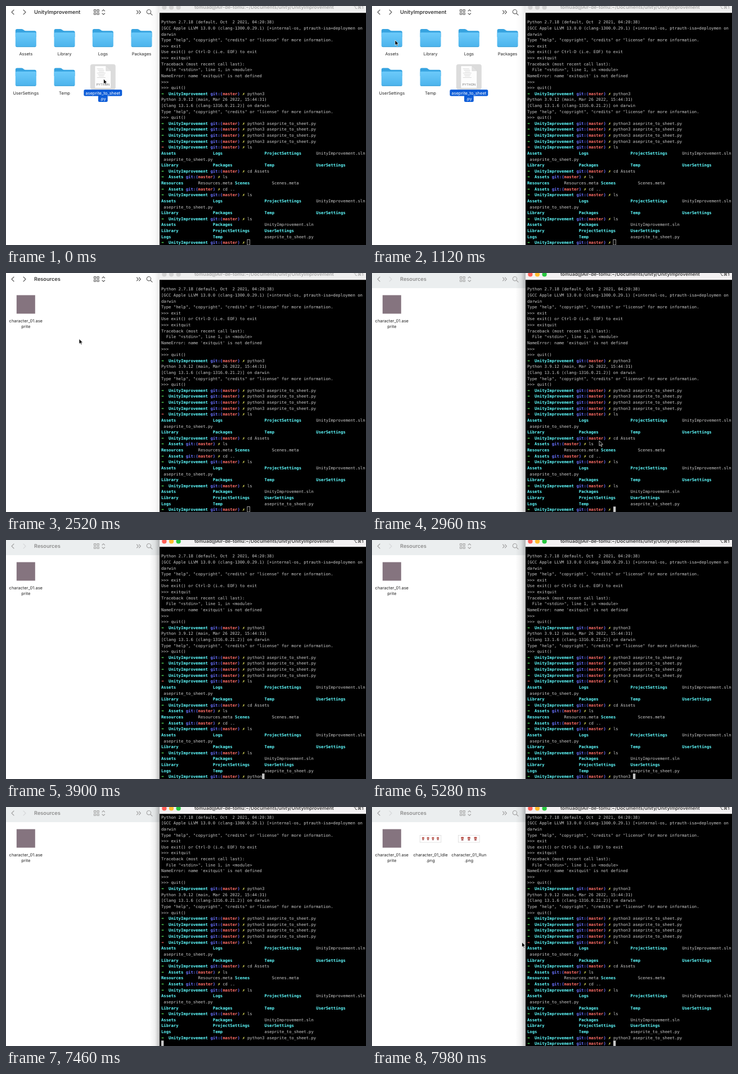
Animation of 640x426 px, one loop 8000 ms. Source, as an HTML page:

```html
<!DOCTYPE html>
<html lang="en">
<head>
<meta charset="utf-8">
<title>Sprite export from the terminal</title>
<style>
  html, body { margin: 0; width: 100%; height: 100%; overflow: hidden; background: #fff; }
  svg { display: block; width: 640px; height: 426px; }
  text { white-space: pre; text-rendering: geometricPrecision; }
  .ui { font-family: Inter, "Open Sans", sans-serif; }
  .label { font-size: 7.5px; text-anchor: middle; fill: #262626; }
  .head { font-size: 9.2px; font-weight: 600; }
  .mono { font: 7.26px "DejaVu Sans Mono", "Noto Sans Mono", monospace; fill: #cbcbcb; }
  .g, .c, .b, .r, .y { font-weight: 700; }
  .g { fill: #5ff967; }
  .c { fill: #5ffdff; }
  .b { fill: #6871ff; }
  .r { fill: #ff6d67; }
  .y { fill: #fefb67; }
</style>
</head>
<body>
<svg id="stage" viewBox="0 0 640 426" xmlns="http://www.w3.org/2000/svg">
  <defs>
    <linearGradient id="front" x2="0" y2="1">
      <stop stop-color="#6ccafa"/><stop offset="1" stop-color="#4bb3ec"/>
    </linearGradient>
    <linearGradient id="shade">
      <stop stop-color="#000" stop-opacity="0"/>
      <stop offset=".55" stop-color="#000" stop-opacity=".06"/>
      <stop offset="1" stop-color="#000" stop-opacity=".26"/>
    </linearGradient>
  </defs>
  <rect width="640" height="426" fill="#fff"/>
  <g id="finder"></g>
  <g id="toolbar"></g>
  <rect id="shadow" x="255" width="18" height="426" fill="url(#shade)"/>
  <rect x="273" width="367" height="426" fill="#000"/>
  <g id="term" class="mono"></g>
  <rect id="caret" width="4.4" height="9.6" y="416.3"/>
  <g id="bar"></g>
  <path id="mouse" d="M0 0V9L2.1 7.1L3.5 10.3L5 9.6L3.6 6.6H6.4Z" fill="#000" stroke="#fff" stroke-width=".7"/>
</svg>
<script>
const LOOP = 8000, FOCUS = 2960, ENTER = 6940, PROMPT = 7640;
const NS = "http://www.w3.org/2000/svg";
const $ = id => document.getElementById(id);

function add(parent, tag, attrs = {}, text) {
  const el = document.createElementNS(NS, tag);
  for (const k in attrs) el.setAttribute(k, attrs[k]);
  if (text !== undefined) el.textContent = text;
  return parent.appendChild(el);
}
const rect = (p, x, y, width, height, fill, rx = 0) => add(p, "rect", { x, y, width, height, fill, rx });
const show = (el, on) => { el.style.display = on ? "" : "none"; };

// ---- Terminal ----
const X0 = 276, CW = 4.37, ROW = 10.62, BASE = 31.3, LAST = 37;
const term = $("term");

// A line is a list of [column, class, text].
function line(row, parts) {
  const g = add(term, "g");
  for (const [col, cls, s] of parts)
    add(g, "text", { x: X0 + col * CW, y: BASE + row * ROW, class: cls }, s);
  return g;
}
const plain = s => [[0, "", s]];
const ls = (...cells) => cells.map(([col, s]) => [col, /\.(py|sln|meta)$/.test(s) ? "" : "c", s]);
function prompt(cmd = "", dir = "UnityImprovement", arrow = "g") {
  const n = dir.length + 4;
  return [[0, arrow, "➜"], [3, "c", dir], [n, "b", "git:("], [n + 5, "r", "master"],
          [n + 11, "b", ")"], [n + 13, "y", "✗"], [n + 15, "", cmd]];
}
const SCRIPT = "aseprite_to_sheet.py", RUN = "python3 " + SCRIPT;
const HELP = 'Type "help", "copyright", "credits" or "license" for more information.';
const listing = [
  ls([0, "Assets"], [21, "Logs"], [42, "ProjectSettings"], [63, "UnityImprovement.sln"]),
  ls([1, SCRIPT]),
  ls([0, "Library"], [21, "Packages"], [42, "Temp"], [63, "UserSettings"])
];
[
  plain("Python 2.7.18 (default, Oct  2 2021, 04:20:38)"),
  plain("[GCC Apple LLVM 13.0.0 (clang-1300.0.29.1) [+internal-os, ptrauth-isa=deploymen on"),
  plain("darwin"),
  plain(HELP),
  plain(">>> exit"),
  plain("Use exit() or Ctrl-D (i.e. EOF) to exit"),
  plain(">>> exitquit"),
  plain("Traceback (most recent call last):"),
  plain('  File "<stdin>", line 1, in <module>'),
  plain("NameError: name 'exitquit' is not defined"),
  plain(">>>"),
  plain(">>> quit()"),
  prompt("python3"),
  plain("Python 3.9.12 (main, Mar 26 2022, 15:44:31)"),
  plain("[Clang 13.1.6 (clang-1316.0.21.2)] on darwin"),
  plain(HELP),
  plain(">>> quit()"),
  prompt(RUN), prompt(RUN), prompt(RUN), prompt(RUN),
  prompt("ls", "UnityImprovement", "r"),
  ...listing,
  prompt("cd Assets"),
  prompt("ls", "Assets"),
  ls([0, "Resources"], [15, "Resources.meta"], [30, "Scenes"], [45, "Scenes.meta"]),
  prompt("cd ..", "Assets"),
  prompt("ls"),
  ...listing,
  prompt("ls"),
  ls([0, "Assets"], [21, "Packages"], [42, "UnityImprovement.sln"]),
  ls([0, "Library"], [21, "ProjectSettings"], [42, "UserSettings"]),
  ls([0, "Logs"], [21, "Temp"], [42, SCRIPT])
].forEach((parts, i) => line(i, parts));
const typed = line(LAST, prompt()).lastChild;
const nextPrompt = line(LAST + 1, prompt());

// Title bar
const bar = $("bar");
const barBg = rect(bar, 273, 0, 367, 12.2, "#eee");
const lights = [281.4, 294, 306.6].map(cx => add(bar, "circle", { cx, cy: 2.5, r: 4.1 }));
const barText = [
  add(bar, "text", { x: 335, y: 5.2, class: "ui", "font-size": 8.4, "font-weight": 600 },
    "tomuad@Air-de-tomu:~/Documents/unity/UnityImprovement"),
  add(bar, "text", { x: 617, y: 5.2, class: "ui", "font-size": 7.6, "font-weight": 600 }, "⌥⌘1")
];

// ---- File browser ----
const COLS = [35.3, 104, 172.3, 241];

function folder(g, cx, y) {
  const x = cx - 18.5;
  add(g, "path", { d: `M${x} ${y + 3}q0-3 3-3h8q2 0 3.5 1.6t3.5 1.6h16q3 0 3 3v8h-37z`, fill: "#36a3e0" });
  rect(g, x, y + 6.2, 37, 26, "url(#front)", 2.4);
  rect(g, x + 1, y + 31, 35, 1, "#3d9fd6", .5);
}
function sheet(g, cx, y, name) {
  const x = cx - 14.5;
  add(g, "path", { d: `M${x} ${y - 4}h20l9 9v31h-29z`, fill: "#fdfdfd", stroke: "#cfcfcf", "stroke-width": .7 });
  add(g, "path", { d: `M${x + 20} ${y - 4}v9h9z`, fill: "#e2e2e2", stroke: "#cfcfcf", "stroke-width": .5 });
  if (!name) return;
  for (let i = 0; i < 7; i++)
    rect(g, x + 4 + i % 3 * 1.6, y + 1 + i * 2.6, i < 2 ? 11 : 15 - i % 3 * 3, .7, "#c9c9c9");
  add(g, "text", { x: cx, y: y + 31.5, class: "ui", "font-size": 5.6, "text-anchor": "middle", fill: "#777" }, name);
}
const blank = (g, cx, y) => sheet(g, cx, y, "");
const python = (g, cx, y) => sheet(g, cx, y, "PYTHON");
const sprite = (g, cx) => rect(g, cx - 16.5, 39.5, 33, 33, "#85747f");

function strip(n) {
  return (g, cx) => {
    const step = 35 / n, k = n === 3 ? 1.2 : 1;
    add(g, "rect", { x: cx - 18.8, y: 50.5, width: 37.6, height: 12.5, fill: "#fff", stroke: "#d6d6d6", "stroke-width": .7 });
    for (let i = 0; i < n; i++) {
      const x = cx - 17.5 + (i + .5) * step;
      rect(g, x - 2 * k, 56.6 - 2.6 * k, 4 * k, 2.8 * k, "#b54a45", .8);
      rect(g, x - 1 * k, 56.6 - .6 * k, 2 * k, 1.4 * k, "#e2ad92");
      rect(g, x - 1.6 * k, 56.6 + .8 * k, 3.2 * k, 1.7 * k, "#943c40", .5);
    }
  };
}

function item(parent, col, row, icon, lines, selected) {
  const g = add(parent, "g"), cx = COLS[col], top = 41 + 69.6 * row;
  if (selected) rect(g, cx - 22.5, top - 6.8, 45, 45, "#dcdcdc", 4);
  icon(g, cx, top);
  lines.forEach((s, i) => {
    const y = top + 47 + i * 10.3;
    const t = add(g, "text", { x: cx, y, class: "ui label" }, s);
    if (!selected) return;
    const w = t.getComputedTextLength() + 6;
    g.insertBefore(rect(g, cx - w / 2, y - 8.6, w, 11.6, "#0b5cd8", 2.5), t);
    t.style.fill = "#fff";
  });
}

const finder = $("finder");
function root(pick) {
  const g = add(finder, "g");
  ["Assets", "Library", "Logs", "Packages", "UserSettings", "Temp"]
    .forEach((s, i) => item(g, i % 4, i >> 2, folder, [s], s === pick));
  item(g, 2, 1, python, ["aseprite_to_sheet", ".py"], pick === "py");
  return g;
}
function assets(pick) {
  const g = add(finder, "g");
  ["Resources", "Resources.meta", "Scenes", "Scenes.meta"]
    .forEach((s, i) => item(g, i, 0, i % 2 ? blank : folder, [s], s === pick));
  return g;
}
function resources() {
  const g = add(finder, "g");
  item(g, 0, 0, sprite, ["character_01.ase", "prite"]);
  return g;
}
// [time, heading, view]
const VIEWS = [
  [0, "UnityImprovement", root("py")],
  [1180, "UnityImprovement", root("Assets")],
  [1320, "Assets", assets()],
  [1600, "Assets", assets("Resources")],
  [1760, "Resources", resources()]
];
const exported = add(finder, "g");
item(exported, 1, 0, strip(4), ["character_01_Idle", ".png"]);
item(exported, 2, 0, strip(3), ["character_01_Run", ".png"]);

// Toolbar
const tools = $("toolbar");
const toolBg = rect(tools, 0, 0, 273, 27, "#ebeeef");
const heading = add(tools, "text", { x: 50, y: 14.3, class: "ui head" });
const icon = d => add(tools, "path", {
  d, fill: "none", "stroke-width": 1.1, "stroke-linecap": "round", "stroke-linejoin": "round"
});
const icons = icon("M14 7L10 11L14 15" +
  "M156.5 6.5h3.2v3.2h-3.2zM162 6.5h3.2v3.2h-3.2zM156.5 12h3.2v3.2h-3.2zM162 12h3.2v3.2h-3.2z" +
  "M171 9L173.3 6.6L175.6 9M171 13L173.3 15.4L175.6 13" +
  "M232.5 8L235.3 11L232.5 14M236.5 8L239.3 11L236.5 14" +
  "M257.6 10.2a3.7 3.7 0 1 0-7.4 0a3.7 3.7 0 1 0 7.4 0M256.6 13L260 16.2");
const forward = icon("M31 7L35 11L31 15");

// ---- Timeline ----
// [time, text, columns the caret sits past the text]
const KEYS = [[0, "", 0]];
[..."python"].forEach((c, i) => KEYS.push([3500 + i * 80, "python".slice(0, i + 1), 0]));
KEYS.push([4520, "python3", 0], [5280, "python3", 1], [5840, "python3 a", 0], [6000, "python3 as", 0],
          [6160, "python3 ase", 0], [6400, RUN, 1], [6800, RUN, 0]);

// [time, x, y]
const PATH = [[0, 173.5, 130], [20, 173.5, 130], [800, 41, 61], [1780, 41, 61], [2380, 130, 117.5],
              [2520, 130, 117.5], [2780, 404, 299], [7480, 404, 299], [7960, 266.5, 241], [LOOP, 266.5, 241]];

const current = (table, t) => table.filter(k => k[0] <= t).pop();

function mouseAt(t) {
  const i = Math.max(1, PATH.findIndex(p => p[0] > t));
  const [t0, x0, y0] = PATH[i - 1], [t1, x1, y1] = PATH[i];
  const u = (t - t0) / (t1 - t0), e = u * u * (3 - 2 * u);
  return `translate(${x0 + (x1 - x0) * e} ${y0 + (y1 - y0) * e})`;
}

const set = (el, attrs) => { for (const k in attrs) el.setAttribute(k, attrs[k]); };

function render(t) {
  const focus = t >= FOCUS, entered = t >= ENTER, done = t >= PROMPT;

  const view = current(VIEWS, t);
  for (const v of VIEWS) show(v[2], v === view);
  show(exported, t >= 7520);
  heading.textContent = view[1];
  set(heading, { fill: focus ? "#8d8d8d" : "#3a3a3a" });
  set(icons, { stroke: focus ? "#a3a3a3" : "#5c5c5c" });
  set(forward, { stroke: focus ? "#d6d9da" : "#5c5c5c" });
  show(toolBg, focus);
  set($("shadow"), { opacity: focus ? 1 : .35 });

  set(barBg, { fill: focus ? "#f3f1f2" : "#efefef" });
  const on = ["#ff5f57", "#febc2e", "#28c840"];
  lights.forEach((l, i) => set(l, { fill: focus ? on[i] : "#d2d2d2" }));
  barText.forEach(el => set(el, { fill: focus ? "#3c3c3c" : "#a8a8a8" }));

  const [, text, gap] = current(KEYS, t);
  typed.textContent = text;
  set(term, { transform: `translate(0 ${entered ? -ROW : 0})` });
  show(nextPrompt, done);
  const col = entered ? (done ? 35 : 0) : 35 + text.length + gap;
  set($("caret"), {
    x: X0 + col * CW,
    fill: focus ? "#c7c7c7" : "none",
    stroke: focus ? "none" : "#c7c7c7",
    "stroke-width": .8
  });

  show($("mouse"), t < 3500 || t >= 7480);
  set($("mouse"), { transform: mouseAt(t) });
}

const start = performance.now();
function tick() {
  render((performance.now() - start) % LOOP);
  requestAnimationFrame(tick);
}
tick();
</script>
</body>
</html>
```
